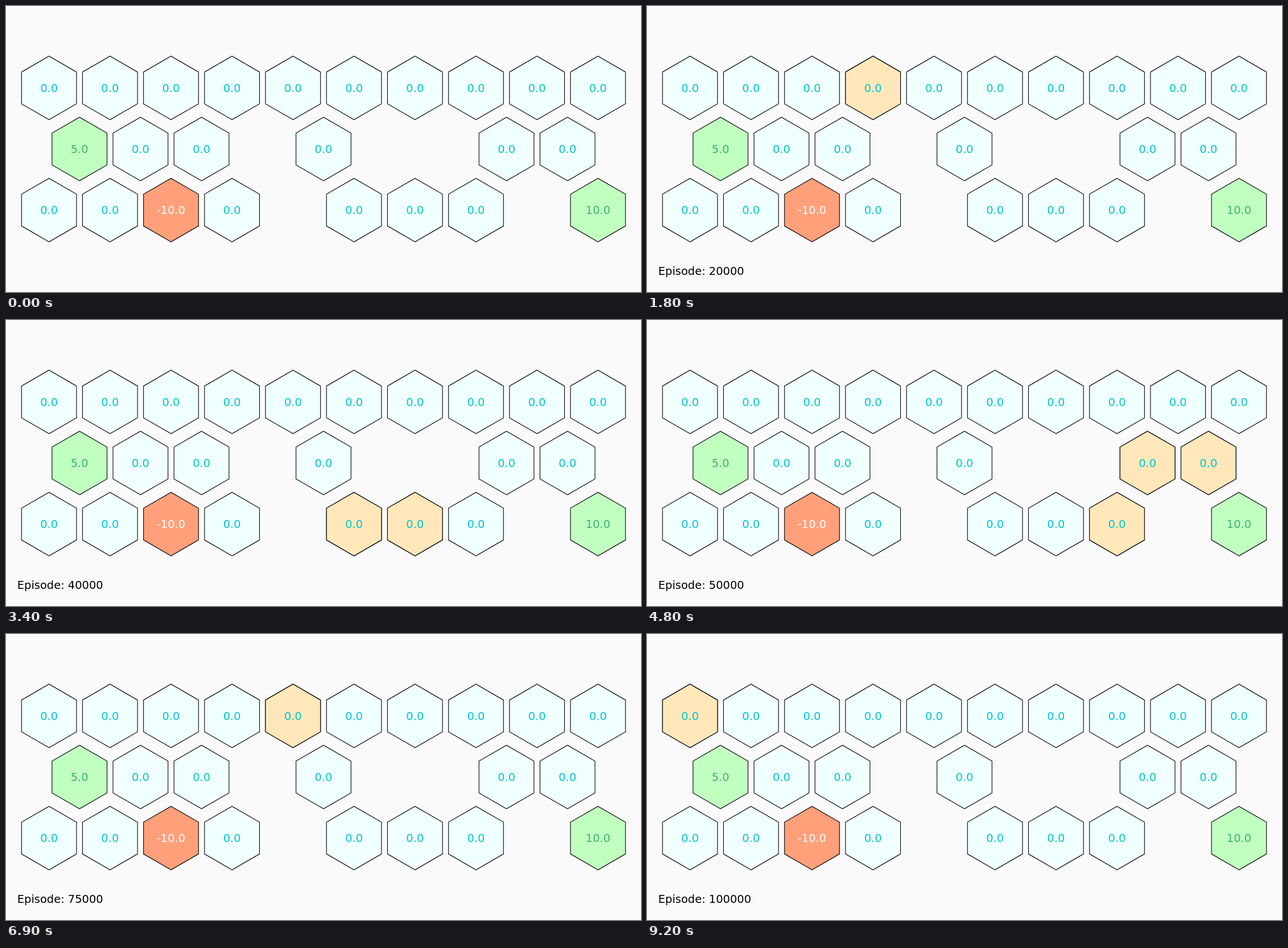
Animation, 1116 px wide and 502 px high, one loop 9.3 s. Source, as an HTML page with a canvas:

```html
<!DOCTYPE html>
<html lang="en">
<head>
<meta charset="utf-8">
<title>Hexagonal grid episodes</title>
<style>
  html, body { margin: 0; width: 100%; height: 100%; overflow: hidden; background: #fafafa; }
  canvas { display: block; }
</style>
</head>
<body>
<canvas id="stage" width="1116" height="502"></canvas>
<script>
const ctx = document.getElementById('stage').getContext('2d');
const STEP = 100, FRAMES = 93, PITCH = 107.2, RADIUS = 55.8;

// One character per column: o open, g goal, x trap, . nothing
const GRID = ['oooooooooo', 'goo.o..oo.', 'ooxo.ooo.g'];
const STYLE = {
  o: ['#f0ffff', '#00c5cd'],
  g: ['#c1ffc1', '#3cb371'],
  x: ['#ffa07a', '#ffffff']
};
const LIT = '#ffe7ba';

const row = (r, from, to) =>
  Array.from({ length: to - from + 1 }, (_, i) => [r, from + i]);

const SHORT = row(0, 0, 2);
const TOP = [...row(0, 0, 8), [1, 8]];
const CORNER = [...row(0, 0, 9), [1, 8]];
const LOW = [...row(0, 0, 4), [1, 4], ...row(2, 5, 7), ...row(1, 7, 8)];

// First frame of each episode; the frame before the next one is empty
const STARTS = [1, 4, 8, 12, 17, 22, 25, 28, 32, 37, 45, 50, 54, 58, 62, 67, 73, 80, 84, 88, 92, 97];
const ROUTES = [SHORT, SHORT, SHORT, LOW, TOP, CORNER, TOP, CORNER, LOW, CORNER, LOW];

function valueAt(r, c) {
  const kind = GRID[r][c];
  if (kind === 'x') return '-10.0';
  if (kind === 'g') return r === 1 ? '5.0' : '10.0';
  return '0.0';
}

function drawCell(r, c, lit) {
  const [fill, ink] = STYLE[GRID[r][c]];
  const x = 75.6 + PITCH * (c + (r % 2) / 2);
  const y = 143.8 + PITCH * r;
  ctx.beginPath();
  for (let i = 0; i < 6; i++) {
    const a = Math.PI * (i / 3 + 0.5);
    ctx.lineTo(x + RADIUS * Math.cos(a), y + RADIUS * Math.sin(a));
  }
  ctx.closePath();
  ctx.fillStyle = lit ? LIT : fill;
  ctx.fill();
  ctx.stroke();
  ctx.fillStyle = ink;
  ctx.textAlign = 'center';
  ctx.fillText(valueAt(r, c), x, y + 7.2);
}

function drawEpisode(frame) {
  const n = STARTS.findLastIndex(s => s <= frame);
  if (n < 0 || frame === STARTS[n + 1] - 1) return;
  const route = ROUTES[n] || TOP;
  const last = STARTS[n + 1] - STARTS[n] - 2;
  const progress = (frame - STARTS[n]) / last;
  const head = Math.ceil(progress * (route.length - 1) - 0.5);
  const trail = 1 + (head > 5) + (head > 8);
  for (const [r, c] of route.slice(head + 1 - trail, head + 1)) drawCell(r, c, true);
  ctx.fillStyle = '#000';
  ctx.textAlign = 'left';
  ctx.fillText('Episode: ' + n * 5000, 19.8, 472);
}

function draw(now) {
  const frame = Math.floor(now / STEP) % FRAMES;
  ctx.fillStyle = '#fafafa';
  ctx.fillRect(0, 0, 1116, 502);
  ctx.font = '19.44px "DejaVu Sans", sans-serif';
  ctx.strokeStyle = '#000';
  ctx.lineWidth = 1.1;
  GRID.forEach((line, r) => [...line].forEach((kind, c) => {
    if (kind !== '.') drawCell(r, c, false);
  }));
  drawEpisode(frame);
}

const origin = performance.now();
function tick() {
  draw(performance.now() - origin);
  requestAnimationFrame(tick);
}
tick();
</script>
</body>
</html>
```
